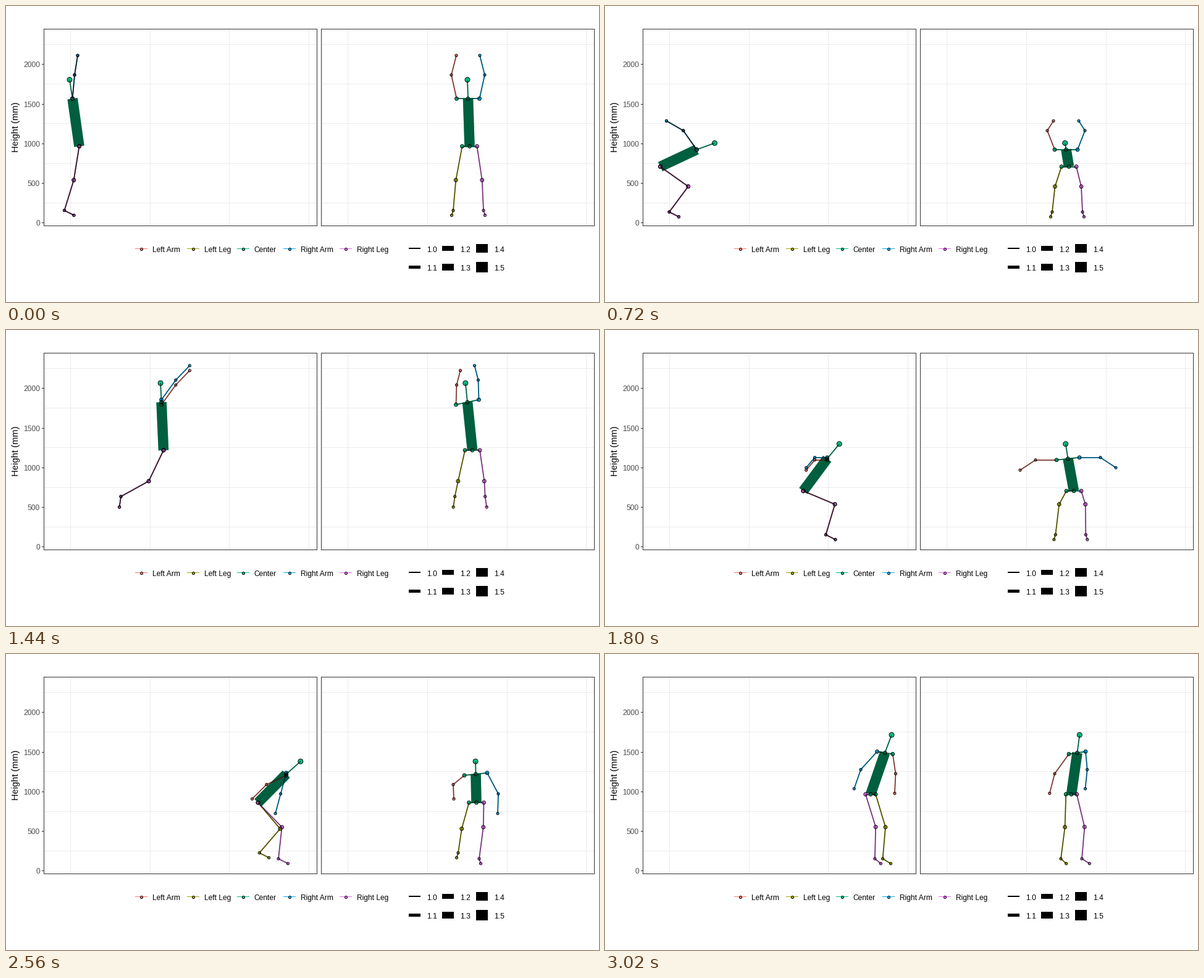
Recreate the animation shown at these times as a matplotlib script. Size 960 by 480 pixels, loop 3040 ms.

```python
import numpy as np
import matplotlib.pyplot as plt
from matplotlib.animation import FuncAnimation
from matplotlib.collections import LineCollection
from matplotlib.patches import Rectangle

W, H, DPI = 960, 480, 80
PX = 72 / DPI                      # one pixel in points
FRAMES, STEP = 152, 20
T = np.arange(FRAMES) * STEP
plt.rcParams["font.family"] = ["Liberation Sans", "DejaVu Sans"]

GROUPS = {"Left Arm": "#F8766D", "Left Leg": "#A3A500", "Center": "#00BF7D",
          "Right Arm": "#00B0F6", "Right Leg": "#E76BF3"}
THIGH, SHANK, FOOT, UPPER, FORE, NECK = 55.5, 51.5, 17.5, 39.5, 33, 31
HIP_HALF, SHOULDER_HALF = 12, 18.5


def curve(*rows):
    """Monotone cubic through rows of (ms, value, ...); one series per value."""
    t, *v = np.array(rows, float).T
    v = np.array(v)
    h = np.diff(t)
    d = np.diff(v) / h
    w1, w2 = h[:-1] + 2 * h[1:], 2 * h[:-1] + h[1:]
    prod = d[:, :-1] * d[:, 1:]
    den = np.where(prod > 0, w1 * d[:, 1:] + w2 * d[:, :-1], 1)
    m = np.zeros_like(v)
    m[:, 1:-1] = np.where(prod > 0, (w1 + w2) * prod / den, 0)
    now = np.clip(T, t[0], t[-1])
    i = np.clip(np.searchsorted(t, now, side="right") - 1, 0, len(h) - 1)
    s = (now - t[i]) / h[i]
    a, b = v[:, i], v[:, i + 1]
    out = (a + (b - a) * s * s * (3 - 2 * s)
           + h[i] * s * (1 - s) * (m[:, i] * (1 - s) - m[:, i + 1] * s))
    return out if len(out) > 1 else out[0]


def ease(t0, t1):
    s = np.clip((T - t0) / (t1 - t0), 0, 1)
    return s * s * (3 - 2 * s)


# Standing long jump: swing back, take off near 1.2 s, land near 1.7 s, walk on, turn.
hip_x, hip_y = curve((0, 118.5, 227.5), (480, 92, 241), (720, 89.5, 260.5), (900, 102, 266),
                     (1180, 167, 231), (1440, 255, 195), (1640, 296, 221),
                     (1800, 321, 261), (2140, 358.5, 245.5), (2560, 408, 241),
                     (3020, 430, 227.5))
lean = curve((0, -8), (500, 40), (760, 66), (900, 61), (1180, 17), (1440, -2.5),
             (1800, 36.5), (2140, 67), (2560, 44.7), (3020, 19))
hip_z, chest_z = curve((0, 750.5, 748), (720, 751, 746.5), (1440, 755, 747),
                       (1800, 759, 749.5), (2140, 755, 751), (2560, 761.5, 760.5),
                       (3020, 755, 764.5))
# Arm angles from straight down, then how far each half reaches sideways
upper, fore, upper_out, fore_out = curve(
    (0, 175, 171, 8.5, -8), (480, -20, -30, 17, 12), (720, -145, -120, 12, -10),
    (1080, 30, 60, 14, 8), (1440, 144, 136, -1, -6), (1680, 30, 40, 37, 31),
    (1800, -90, -40, 34, 25), (2140, -74, -62, 18, 2), (2560, -40, -30, 18, -1),
    (3020, -26, -15, 20, 5))
swing = curve((2140, 0), (2560, 25), (3020, -5))
ankle_x, ankle_y, pitch = curve((0, 94.5, 331.5, 27), (720, 104, 334, 27), (1050, 107, 331, 30),
                                (1180, 118, 323, 73), (1440, 186, 270, 98),
                                (1640, 328, 307, 32), (1710, 357.5, 332, 27))
feet_z = curve((1180, 748.5), (1710, 754), (2560, 749), (3020, 755))
feet_half = 24.5 - 7.5 * ease(2200, 2560)
tilt = curve((1180, 0), (1440, 4), (1800, 2))
yaw = np.radians(43 * ease(2560, 3020))


def shift(base, fwd, left, down):
    """Move from a joint along the turned body axes: (side x, front x, y)."""
    c, s = np.cos(yaw), np.sin(yaw)
    return base + np.array([fwd * c + left * s, fwd * s - left * c, down + 0 * T])


def limb(base, length, angle, out, sign):
    a, r = np.radians(angle), np.sqrt(length ** 2 - out ** 2)
    return shift(base, r * np.sin(a), sign * out, r * np.cos(a))


def bend_knee(hip, ankle, sign):
    dx, dy = ankle[0] - hip[0], ankle[2] - hip[2]
    dist = np.hypot(dx, dy)
    reach = np.minimum(dist, THIGH + SHANK)
    along = (THIGH ** 2 - SHANK ** 2 + reach ** 2) / (2 * reach)
    fwd = np.sqrt(np.maximum(THIGH ** 2 - along ** 2, 0))
    front = (hip[1] + ankle[1]) / 2 - 3 * sign + 8 * np.sin(yaw)
    return np.array([hip[0] + (dx * along + dy * fwd) / dist, front,
                     hip[2] + (dy * along - dx * fwd) / dist])


rad = np.radians(lean)
spine = 78 - 13 * np.clip(lean / 36, 0, 1)
pelvis = np.array([hip_x, hip_z, hip_y])
neck = np.array([hip_x + spine * np.sin(rad), chest_z, hip_y - spine * np.cos(rad)])
head = neck + np.array([NECK * np.sin(1.08 * rad), 0.4 * (chest_z - hip_z),
                        -NECK * np.cos(1.08 * rad)])

joints, fills, radii = [], [], []
bones = []                         # (start, end, colour, width)


def joint(pos, color, radius):
    joints.append(pos)
    fills.append(color)
    radii.append(radius)
    return len(joints) - 1


def chain(ids, color, width=1.7):
    bones.extend((a, b, color, width) for a, b in zip(ids, ids[1:]))


mid = GROUPS["Center"]
core = [joint(p, mid, r) for p, r in ((head, 4), (neck, 2.9), (pelvis, 2.9))]
chain(core[1:], mid, 16.5)
chain(core[:2], mid)

# Left is +1, right is -1; each side walks its own step after landing
for side, sign, t0, t1, stride, lift in (("Left", 1, 2220, 2820, 88, 10),
                                         ("Right", -1, 2070, 2460, 83.5, 16)):
    arm, leg = GROUPS[side + " Arm"], GROUPS[side + " Leg"]
    shoulder = shift(neck, 0, sign * SHOULDER_HALF, sign * tilt)
    elbow = limb(shoulder, UPPER, upper - sign * swing, upper_out, sign)
    wrist = limb(elbow, FORE, fore - sign * 0.6 * swing, fore_out, sign)
    hip = shift(pelvis, 0, sign * HIP_HALF, 0)
    step = ease(t0, t1)
    ankle = np.array([ankle_x + stride * step + sign * 6 * np.sin(yaw),
                      feet_z - sign * feet_half,
                      ankle_y - lift * np.sin(np.pi * step)])
    toe = limb(ankle, FOOT, 90 - pitch, 2.5, sign)
    knee = bend_knee(hip, ankle, sign)
    own = sign < 0
    s = joint(shoulder, arm if own else mid, 2.9)
    h = joint(hip, leg if own else mid, 2.9)
    chain([s] + [joint(p, arm, 2.1) for p in (elbow, wrist)], arm)
    chain([h] + [joint(p, leg, r) for p, r in ((knee, 2.9), (ankle, 2.1), (toe, 2.1))], leg)
    chain([s, core[1]], mid)
    chain([h, core[2]], mid)

track = np.array(joints)
starts, ends, bone_colors, bone_widths = (list(c) for c in zip(*bones))

fig = plt.figure(figsize=(W / DPI, H / DPI), dpi=DPI, facecolor="white")
ax = fig.add_axes([0, 0, 1, 1])
ax.set(xlim=(0, W), ylim=(H, 0))
ax.axis("off")


def line(xs, ys, color, **kw):
    ax.plot(xs, ys, color=color, lw=PX, antialiased=False,
            solid_capstyle="butt", **kw)


def label(x, y, text, size=12, color="black", **kw):
    ax.text(x, y, text, fontsize=size * PX, color=color, va="baseline", **kw)


def dots(xy, r, **kw):
    return ax.scatter(*np.transpose(xy), s=(2 * np.array(r) * PX) ** 2,
                      linewidths=0.9 * PX, **kw)


# Panels and axis
for left, zero in ((61, 104), (510, 553.4)):
    for mm in range(250, 2500, 500):
        y = int(351.5 - mm * 0.1285)
        line([left, left + 442], [y, y], "#EBEBEB", zorder=1)
    for k in range(4):
        x = round(zero + k * 128.6)
        line([x, x], [37, 356], "#EBEBEB", zorder=1)
    ax.add_patch(Rectangle((left, 37), 442, 319, fill=False, ec="#333333",
                           lw=PX, antialiased=False, zorder=2))
for mm in range(0, 2001, 500):
    y = round(351.4 - mm * 0.1285)
    line([58, 61], [y, y], "#333333", zorder=2)
    label(55, y + 5, str(mm), color="#4D4D4D", ha="right")
label(20, 196, "Height (mm)", 14.7, rotation=90, ha="center", rotation_mode="anchor")

# Legends
for (text, color), x in zip(GROUPS.items(), (218.5, 302.5, 383.5, 458.5, 549.5)):
    line([x - 9.5, x + 9.5], [393, 393], color, zorder=3)
    dots([(x, 393.7)], 2.1, c=color, edgecolors="black", zorder=4)
    label(x + 18.3, 399, text)
for k in range(6):
    col, row = divmod(k, 2)
    x, y, size = int(652 + 54.5 * col), 393 + 30.5 * row, 2 + 3 * k
    ax.add_patch(Rectangle((x, y - size / 2), 19, size, fc="black", lw=0))
    label(x + 28.7, 398.8 + 30 * row, f"{1 + k / 10:.1f}")

# Figure, once per panel: colours, then translucent black bones, then rings
widths = np.array(bone_widths * 2) * PX


def strokes(colors, z, **kw):
    return ax.add_collection(LineCollection(
        [], colors=colors, linewidths=widths, capstyle="butt", zorder=z, **kw))


blank = np.zeros((2 * len(joints), 2))
tint = strokes(bone_colors * 2, 5)
fill = dots(blank, radii * 2, c=fills * 2, edgecolors="none", zorder=6)
shade = strokes("black", 7, alpha=0.5)
ring = dots(blank, radii * 2, facecolors="none", edgecolors="black", zorder=8)


def draw(f):
    pose = track[:, :, f]
    views = [pose[:, [0, 2]], pose[:, [1, 2]]]
    segs = np.concatenate([np.stack([v[starts], v[ends]], 1) for v in views])
    for c in (tint, shade):
        c.set_segments(segs)
    for c in (fill, ring):
        c.set_offsets(np.concatenate(views))
    return tint, fill, shade, ring


anim = FuncAnimation(fig, draw, frames=FRAMES, interval=STEP, repeat=True,
                     repeat_delay=0, blit=False)
plt.show()
```
